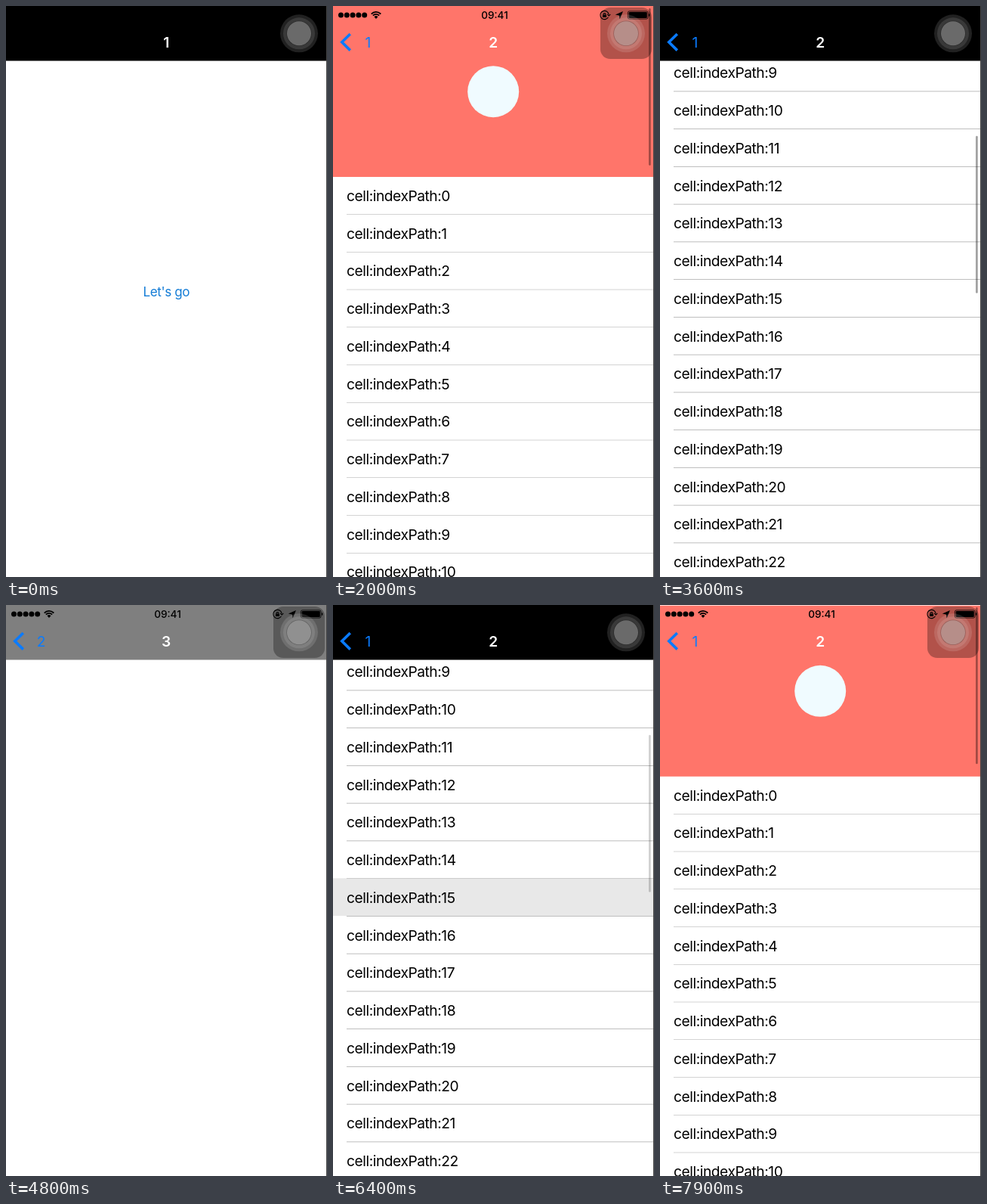
Animation, 425 px wide and 755 px high, one loop 8 s. Source, as an HTML page with a canvas:

```html
<!DOCTYPE html>
<html>
<head>
<meta charset="utf-8">
<style>
html, body { margin: 0; width: 100%; height: 100%; overflow: hidden; background: #fff; }
canvas { display: block; }
</style>
</head>
<body>
<canvas id="stage" width="425" height="755"></canvas>
<script>
const W = 424, H = 755, LOOP = 8000;
const BAR = 72.4, HEADER = 226.1, ROW = 49.75, ROWS = 50, PICKED = 15;
const BLUE = '#0a7bff';
const c = document.getElementById('stage').getContext('2d');

const clamp = (x, a = 0, b = 1) => Math.min(b, Math.max(a, x));
const mix = (a, b, p) => a + (b - a) * p;
const span = (t, a, b) => clamp((t - a) / (b - a));
const slide = (t, start) => 1 - (1 - span(t, start, start + 500)) ** 3;

// Cubic from a (at rest) to b, leaving with the given end slope.
const drag = (a, b, slope, p) => mix(a, b, p * p * (3 - 2 * p)) + slope * (p ** 3 - p * p);

function scrollAt(t) {
  if (t < 2000) return 0;
  if (t < 2600) return drag(0, 432.8, 336, (t - 2000) / 600);
  if (t < 3600) {
    const end = Math.exp(-3);
    return 610.4 - 177.6 * (Math.exp(-3 * (t - 2600) / 1000) - end) / (1 - end);
  }
  if (t < 6400) return 610.4;
  if (t < 7200) return drag(610.4, 0, -400, (t - 6400) / 800);
  const s = (t - 7200) / 1000;
  return -500 * s * Math.exp(-9 * s);
}

function indicatorAt(t) {
  if (t < 3800) return span(t, 1450, 1650);
  if (t < 5000) return 1 - span(t, 3800, 4100);
  if (t < 6400) return span(t, 6050, 6200) * (1 - 0.5 * span(t, 6300, 6400));
  return 0.5 + 0.5 * span(t, 6400, 6500);
}

function highlightAt(t) {
  return t < 4300 ? 0 : 1 - span(t, 6320, 6525);
}

function faded(alpha, draw) {
  c.save();
  c.globalAlpha *= alpha;
  draw();
  c.restore();
}

function box(x, y, w, h, color, r = 0) {
  c.fillStyle = color;
  c.beginPath();
  c.roundRect(x, y, w, h, r);
  c.fill();
}

function disc(x, y, r, color) {
  c.fillStyle = color;
  c.beginPath();
  c.arc(x, y, r, 0, 7);
  c.fill();
}

function line(points, width, color) {
  c.strokeStyle = color;
  c.lineWidth = width;
  c.beginPath();
  points.forEach(([x, y]) => c.lineTo(x, y));
  c.stroke();
}

function text(s, x, y, size, color, { weight = 400, align = 'left', gap = 0 } = {}) {
  c.font = `${weight} ${size}px Inter, sans-serif`;
  c.letterSpacing = gap + 'px';
  c.textAlign = align;
  c.fillStyle = color;
  c.fillText(s, x, y);
}

function startPage(t) {
  box(0, 0, W, H, '#fff');
  const pressed = t >= 900 ? 0.3 + 0.7 * span(t, 1000, 1250) : 1;
  faded(pressed, () =>
    text("Let's go", 212.3, 384, 17, '#137cd6', { align: 'center', gap: -0.35 }));
}

function listPage(t) {
  const offset = scrollAt(t);
  box(0, 0, W, H, '#fff');
  box(0, -offset, W, HEADER, '#ff756a');
  disc(212.2, 113.2 - offset, 34, '#f0fbff');
  for (let i = 0; i < ROWS; i++) {
    const y = HEADER + i * ROW - offset;
    if (y < -ROW || y > H) continue;
    if (i === PICKED)
      faded(highlightAt(t), () => box(0, y - 0.6, W, ROW, '#d9d9d9'));
    text('cell:indexPath:' + i, 18, y + ROW / 2 + 7, 19.22, '#000', { gap: -0.46 });
    box(18, y + ROW - 0.6, W - 18, 0.6, '#a8a8a8');
  }
  const length = 208 + Math.min(0, offset);
  faded(indicatorAt(t), () =>
    box(418, 3 + 0.2765 * Math.max(0, offset), 2.8, length, 'rgba(0,0,0,.36)', 1.4));
}

function blankPage() {
  box(0, 0, W, H, '#fff');
}

const PAGES = [
  { draw: startPage, title: '1', shade: () => 1 },
  { draw: listPage, title: '2', back: '1', shade: t => clamp(scrollAt(t) / 150) },
  { draw: blankPage, title: '3', back: '2', shade: () => 0.5 }
];

function shifted(dx, draw) {
  c.save();
  c.translate(dx, 0);
  draw();
  c.restore();
}

const title = (s, x, alpha) => faded(alpha, () =>
  text(s, x, 54.8, 19.22, '#fff', { weight: 600, align: 'center' }));

const backLabel = (s, x, alpha) => faded(alpha, () =>
  text(s, x, 54.8, 19.22, BLUE, { align: 'center' }));

function navBar(t, lower, upper, p) {
  faded(mix(lower.shade(t), upper.shade(t), p), () => box(0, 0, W, BAR, '#000'));

  const pressed = t >= 5500 && t < 6050 ? 0.3 + 0.7 * span(t, 5550, 5850) : 1;
  const arrow = lower.back ? 1 : p;
  faded(arrow * pressed, () => line([[22.8, 37], [11.8, 47.8], [22.8, 58.6]], 3.6, BLUE));

  title(lower.title, mix(212.2, 46.5, p), clamp(1 - 1.5 * p));
  title(upper.title, mix(400, 212.2, p), p);
  if (lower.back) backLabel(lower.back, mix(46.5, -60, p), clamp(1 - 1.5 * p));
  backLabel(upper.back, mix(212.2, 46.5, p), p * p * pressed);
}

function statusBar() {
  for (let i = 0; i < 5; i++) disc(10.5 + i * 7.8, 12, 3.5, '#000');

  // Wi-Fi fan
  c.strokeStyle = '#000';
  c.lineWidth = 1.8;
  for (const r of [8.6, 5.6]) {
    c.beginPath();
    c.arc(57, 16.5, r, -Math.PI * 0.76, -Math.PI * 0.24);
    c.stroke();
  }
  c.fillStyle = '#000';
  c.beginPath();
  c.moveTo(57, 17);
  c.arc(57, 16.5, 3.4, -Math.PI * 0.76, -Math.PI * 0.24);
  c.fill();

  text('09:41', 214, 16.8, 13.6, '#000', { weight: 500, align: 'center' });

  // Rotation lock
  c.lineWidth = 1.1;
  c.strokeStyle = '#000';
  c.beginPath();
  c.arc(359.5, 12, 5.6, 0.5, 6.1);
  c.stroke();
  box(357, 11.4, 5, 3.6, '#000');
  c.beginPath();
  c.arc(359.5, 11.2, 1.6, Math.PI, 0);
  c.stroke();
  line([[363.3, 11], [365.2, 13], [367.2, 11]], 1.1, '#000');

  // Location arrow
  c.fillStyle = '#000';
  c.beginPath();
  [[384, 7], [379.6, 17.4], [378.8, 12.4], [373.8, 11.6]].forEach(([x, y]) => c.lineTo(x, y));
  c.fill();

  // Battery
  c.lineWidth = 0.8;
  c.beginPath();
  c.roundRect(390.4, 6.9, 26.6, 10.2, 2);
  c.stroke();
  box(391.6, 8, 24.2, 8, '#000', 1);
  box(417.9, 10.2, 1.4, 3.6, '#000', 0.7);
}

function touchButton() {
  box(354, 2, 68, 68, 'rgba(0,0,0,.3)', 13);
  disc(388, 36.3, 25, 'rgba(255,255,255,.13)');
  disc(388, 36.3, 21, 'rgba(255,255,255,.11)');
  disc(388, 36.3, 16.8, 'rgba(0,0,0,.22)');
  disc(388, 36.3, 16, 'rgba(255,255,255,.29)');
}

function render(t) {
  const onFirst = t < 1450;
  const [lower, upper] = onFirst ? PAGES : PAGES.slice(1);
  const p = onFirst ? slide(t, 950)
    : t < 5000 ? slide(t, 4300) : 1 - slide(t, 5550);

  c.globalAlpha = 1;
  blankPage();
  if (p < 1) {
    shifted(-0.3 * W * p, () => lower.draw(t));
    faded(0.1 * p, () => box(0, 0, W, H, '#000'));
  }
  if (p > 0) shifted(W * (1 - p), () => {
    if (p < 1) for (let i = 1; i < 7; i++) box(-i, 0, i, H, 'rgba(0,0,0,.015)');
    upper.draw(t);
  });

  // Once the list has settled it is the lower of the two remaining pages.
  navBar(t, lower, upper, p);
  statusBar();
  touchButton();
  box(W, 0, 1, H, '#444');
}

function tick() {
  render(performance.now() % LOOP);
  requestAnimationFrame(tick);
}
tick();
</script>
</body>
</html>
```
